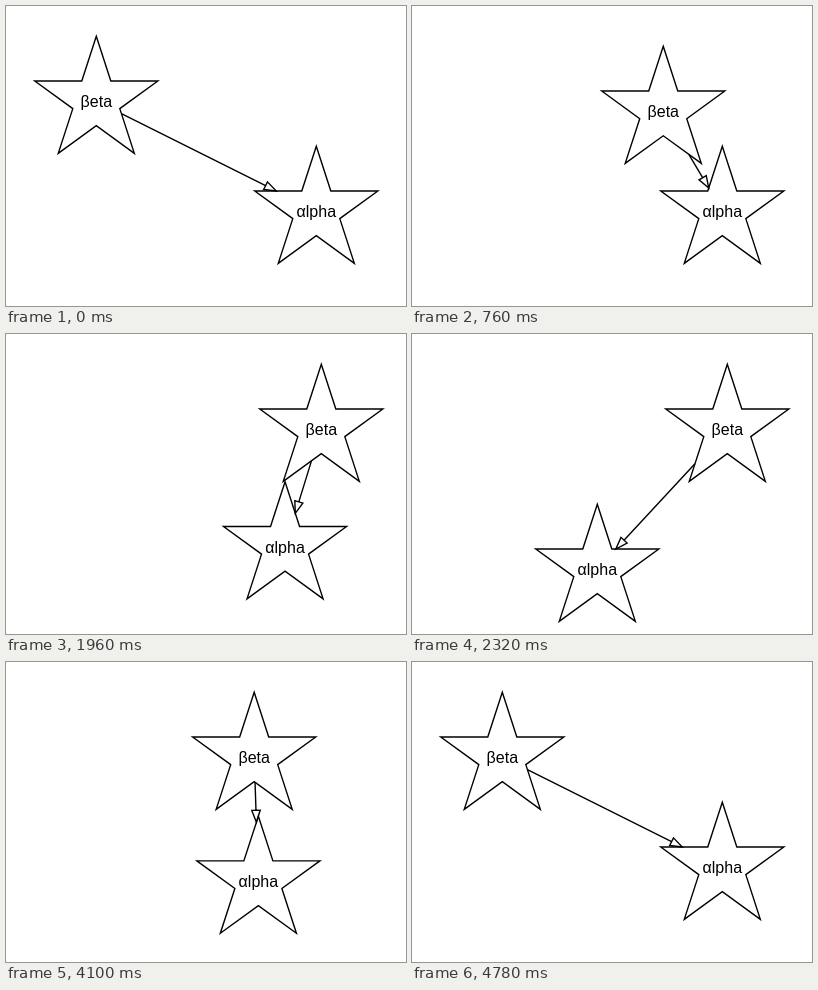
Recreate the animation shown at these times as an HTML page. Size 400 by 300 pixels, loop 6280 ms.

```html
<!DOCTYPE html>
<html lang="en">
<head>
<meta charset="utf-8">
<title>Linked stars</title>
<style>
  html, body { margin: 0; width: 100%; height: 100%; overflow: hidden; background: #fff; }
  svg { display: block; }
  text { font: 16px "Liberation Sans", Arial, sans-serif; text-anchor: middle; }
  path { fill: none; stroke: #000; stroke-width: 1.4; }
</style>
</head>
<body>
<svg width="400" height="300" viewBox="0 0 400 300">
  <g id="beta"><path class="star"/><text y="6">βeta</text></g>
  <g id="alpha"><path class="star"/><text y="6">αlpha</text></g>
  <path id="arrow"/>
</svg>
<script>
const LOOP = 6280, STEP = 40;
const OUTER = 64.7, INNER = OUTER * 0.382, SECTOR = Math.PI / 5;
const HEAD = 12, HALF = 4.2;

const $ = id => document.getElementById(id);
const polar = (r, a) => [r * Math.cos(a), r * Math.sin(a)];

const corners = Array.from({ length: 10 }, (_, i) =>
  polar(i % 2 ? INNER : OUTER, i * SECTOR - Math.PI / 2));
for (const p of document.querySelectorAll('.star')) p.setAttribute('d', `M${corners.join('L')}Z`);

// Each key is [step, x, y]; steps last 40 ms.
const moves = {
  beta: [
    { start: 0, bulge: 13.4, keys: [[0, 90.3, 95], [12, 194.8, 95], [16, 223.8, 95], [26, 315.3, 95]] },
    { start: 3820, bulge: 0, keys: [[0, 315.3, 95], [1, 306.5, 95], [12, 199.6, 95], [16, 153.7, 95], [24, 90.3, 95]] }
  ],
  alpha: [
    { start: 0, bulge: 0, keys: [[0, 310.3, 205]] },
    { start: 1840, bulge: 0, keys: [[0, 310.3, 205], [12, 185.3, 235]] },
    { start: 3820, bulge: 0, keys: [[0, 185.3, 235], [1, 190.9, 233.6], [12, 303.6, 206.6], [13, 310.3, 205]] }
  ]
};

function position(name, time) {
  const { start, bulge, keys } = moves[name].filter(m => m.start <= time).pop();
  const last = keys[keys.length - 1];
  const n = Math.floor((time - start) / STEP);
  if (n >= last[0]) return last.slice(1);
  const i = keys.findIndex(k => k[0] > n);
  const [n0, x0, y0] = keys[i - 1], [n1, x1, y1] = keys[i];
  const u = (n - n0) / (n1 - n0);
  return [x0 + (x1 - x0) * u, y0 + (y1 - y0) * u + bulge * Math.sin(Math.PI * n / last[0])];
}

// Distance from a star's centre to its outline in a given direction.
function reach(angle) {
  const turn = 2 * SECTOR;
  let a = (angle + Math.PI / 2 + 4 * Math.PI) % turn;
  a = Math.min(a, turn - a);
  return OUTER * INNER * Math.sin(SECTOR) / (OUTER * Math.sin(a) + INNER * Math.sin(SECTOR - a));
}

function draw(time) {
  const b = position('beta', time), a = position('alpha', time);
  $('beta').setAttribute('transform', `translate(${b})`);
  $('alpha').setAttribute('transform', `translate(${a})`);

  const angle = Math.atan2(a[1] - b[1], a[0] - b[0]);
  const [ux, uy] = polar(1, angle);
  const along = (p, d, side = 0) => [p[0] + ux * d - uy * side, p[1] + uy * d + ux * side];
  const tail = along(b, reach(angle));
  const tip = along(a, -reach(angle + Math.PI));
  $('arrow').setAttribute('d',
    `M${tail}L${along(tip, -HEAD)}M${tip}L${along(tip, -HEAD, HALF)}L${along(tip, -HEAD, -HALF)}Z`);
}

const began = performance.now();
function tick() {
  draw((performance.now() - began) % LOOP);
  requestAnimationFrame(tick);
}
tick();
</script>
</body>
</html>
```
